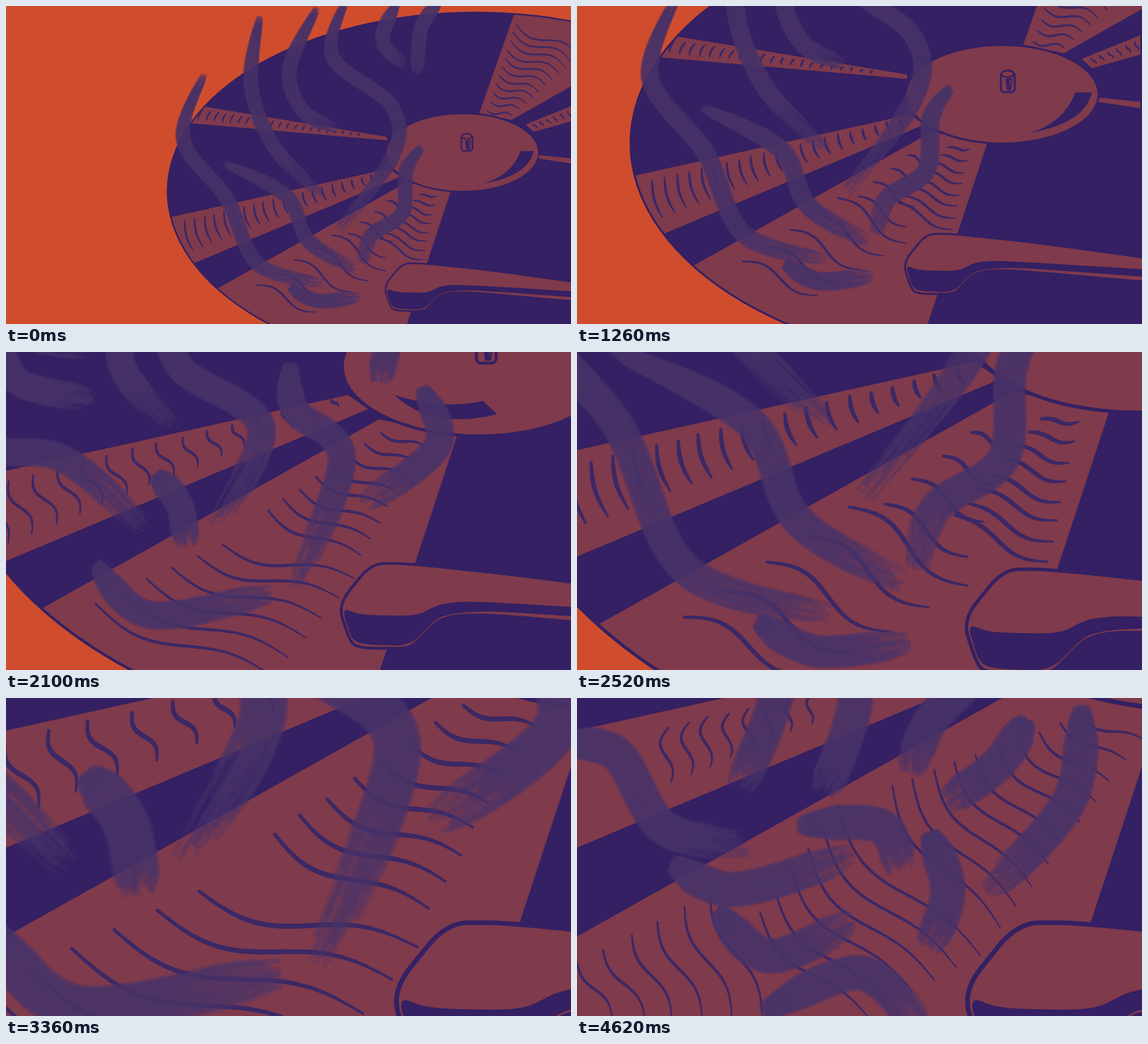
Recreate the animation shown at these times as an HTML page with a canvas. Size 998 by 561 pixels, loop 5.04 s.

```html
<!DOCTYPE html>
<html lang="en">
<head>
<meta charset="utf-8">
<title>Smoking record</title>
<style>
  html, body { margin: 0; width: 100%; height: 100%; overflow: hidden; background: #cf4d2d; }
  canvas { display: block; }
</style>
</head>
<body>
<canvas id="stage" width="998" height="561"></canvas>
<script>
const ctx = document.getElementById('stage').getContext('2d');
const ORANGE = '#cf4d2d', INDIGO = '#342062', MAROON = '#7f3a4c', MARK = '#3b2865', SMOKE = '#47336a';
const STEP = 420;

// Scale and offset of the camera at each step; it then rests on the last one.
const cameras = [
  [1, 0, 0], [1.035, -35, -23], [1.115, -116, -76], [1.26, -265, -170], [1.455, -452, -289],
  [1.78, -601, -435], [2.19, -780, -611], [2.35, -852, -747], [2.97, -1301, -952]
];

// smoke: key points of each brush stroke, as seen by the camera of step "view".
// fans: count, first mark, last mark, bow, wave; the marks between are blended.
const rising = {
  seed: 11, view: 0, width: 27, line: 3.6, shine: [843,313, 892,300, 909,256, 932,256, 922,300],
  smoke: [
    [350,120, 313,235, 390,340, 445,455, 560,490],
    [448,18, 433,140, 475,250, 560,338],
    [550,3, 501,110, 525,185, 585,217],
    [600,-12, 577,90, 680,175, 685,260, 588,395],
    [690,-5, 665,60, 705,105],
    [765,-8, 733,40, 727,122],
    [735,248, 707,290, 700,365, 645,405, 630,455],
    [385,277, 495,335, 535,415, 620,465],
    [500,495, 550,520, 625,512]
  ],
  fans: [
    [21, 316,380,330,430, 662,294,667,303, .08,0],
    [4, 675,343,703,356, 604,401,672,445, 0,-.07],
    [5, 576,405,671,467, 442,493,547,540, 0,-.07],
    [8, 731,332,760,336, 661,411,736,447, .04,-.05]
  ]
};
const drifting = {
  seed: 23, view: 2, width: 32, line: 3, shine: [723,287, 770,302, 811,293, 825,306, 760,322],
  smoke: [
    [222,-8, 209,90, 270,170, 355,195],
    [260,18, 375,115, 390,215, 445,278],
    [340,-8, 405,20, 443,80],
    [605,-10, 535,65, 500,150],
    [690,-10, 685,55, 620,95, 610,150],
    [735,95, 690,165, 675,232],
    [430,145, 455,215, 543,280, 490,390],
    [575,208, 580,260, 632,315, 580,458],
    [720,235, 738,300, 655,365],
    [192,208, 235,298, 325,315, 415,393],
    [255,185, 275,230, 358,250],
    [358,430, 420,487, 555,463],
    [425,330, 452,365, 460,412]
  ],
  fans: [
    [15, 315,378,340,434, 660,291,668,299, 0,.1],
    [6, 427,493,602,567, 553,436,683,468, .03,.05],
    [8, 597,402,690,445, 710,325,752,336, .05,.05]
  ]
};
const curling = {
  seed: 37, view: 4, width: 41, line: 2.8, shine: [788,309, 840,308, 869,277, 890,283, 860,315],
  smoke: [
    [-95,-130, 70,45, 115,210, 280,258],
    [125,-25, 232,70, 250,180, 315,242],
    [440,-15, 387,45, 378,125],
    [535,-20, 552,50, 445,140, 442,218],
    [315,115, 345,215, 468,280, 415,432],
    [605,138, 545,230, 530,312],
    [90,283, 160,395, 300,403, 425,490],
    [185,260, 240,310, 348,322]
  ],
  fans: [
    [17, 318,382,340,436, 665,293,672,299, -.04,.08],
    [4, 423,510,545,560, 520,488,677,534, .07,.04],
    [4, 525,438,601,486, 590,400,600,450, .22,0],
    [6, 725,328,755,337, 634,385,729,436, .05,.06],
    [5, 640,410,706,443, 618,477,660,524, .03,.06]
  ]
};
const sinking = {
  seed: 41, view: 8, width: 70, line: 1.7, shine: rising.shine,
  smoke: [
    [180,-25, 430,40, 520,170, 425,415],
    [-60,345, 180,350, 290,480, 450,512],
    [835,-60, 860,150, 760,295, 730,390],
    [620,182, 640,260, 580,430],
    [700,-30, 665,70, 655,180],
    [-40,120, 100,182, 285,190],
    [308,552, 430,566, 595,532]
  ],
  fans: [
    [4, 449,346,471,376, 519,331,529,347, -.12,0],
    [4, 452,474,462,510, 494,472,515,510, -.04,.03],
    [5, 527,433,596,512, 573,404,667,486, .11,.06],
    [4, 616,410,674,467, 649,365,730,429, .09,.02],
    [5, 660,359,743,413, 727,331,769,340, .09,.02]
  ]
};
const parting = {
  seed: 53, view: 8, width: 64, line: 1.7, shine: drifting.shine,
  smoke: [
    [-60,85, 65,95, 155,230, 310,260],
    [365,-50, 335,50, 285,162],
    [498,-30, 480,55, 435,170],
    [720,-50, 625,40, 590,135],
    [388,225, 535,225, 572,305],
    [165,290, 280,338, 490,275],
    [245,373, 340,455, 490,393],
    [325,555, 500,485, 610,585],
    [795,35, 745,115, 650,185],
    [892,12, 870,180, 725,345],
    [622,235, 655,340, 620,445]
  ],
  fans: [
    [8, 492,338,493,371, 577,318,577,336, .08,.1],
    [6, 438,478,460,510, 518,437,548,510, 0,.06],
    [6, 547,447,611,510, 593,384,677,474, .07,.05],
    [10, 625,373,689,457, 738,331,774,345, .07,.05]
  ]
};
const cycle = [rising, curling, drifting];
const poses = [...cycle, ...cycle, ...cycle, sinking, { ...parting, fans: sinking.fans }, parting];

const sectors = [
  [347,177, 300,169, 290,203, 329,207, 673,237, 673,231],
  [293,372, 250,381, 250,488, 334,453, 697,301, 677,287],
  [376,497, 200,595, 400,750, 646,750, 785,328, 708,311],
  [836,189, 897,16, 905,-7, 1100,-7, 1100,84, 893,201],
  [918,209, 1000,176, 1000,203, 932,222],
  [940,263, 1000,269, 1000,278, 940,269]
];
const arm = [667,495, 700,454, 737,454, 860,467, 1060,495, 1060,526, 826,505, 785,505, 765,511,
  742,535, 732,538, 694,538, 680,534];
const underside = [671,498, 690,505, 745,506, 768,494, 800,491, 1060,507, 1060,518, 826,501, 785,503,
  765,508, 738,536, 690,534, 680,528];

const lerp = (a, b, t) => a + (b - a) * t;

function random(seed) {
  return () => (seed = (seed * 16807) % 2147483647) / 2147483647;
}

function camera(step) {
  return cameras[Math.min(step, cameras.length - 1)];
}

function look(step, from = 0) {
  const [s, x, y] = camera(step), [rs, rx, ry] = camera(from);
  ctx.setTransform(s, 0, 0, s, x, y);
  ctx.scale(1 / rs, 1 / rs);
  ctx.translate(-rx, -ry);
}

function paint(fill, line) {
  if (fill) { ctx.fillStyle = fill; ctx.fill(); }
  if (line) { ctx.strokeStyle = INDIGO; ctx.lineWidth = line; ctx.stroke(); }
}

function polygon(points, fill) {
  ctx.beginPath();
  for (let i = 0; i < points.length; i += 2) ctx.lineTo(points[i], points[i + 1]);
  paint(fill);
}

// Closed outline with every corner rounded.
function blob(p, fill, line) {
  const n = p.length;
  ctx.beginPath();
  for (let i = 0; i < n; i += 2) {
    const x = p[i], y = p[i + 1], nx = p[(i + 2) % n], ny = p[(i + 3) % n];
    const px = p[(i + n - 2) % n], py = p[(i + n - 1) % n];
    ctx.lineTo(lerp(x, px, .35), lerp(y, py, .35));
    ctx.quadraticCurveTo(x, y, lerp(x, nx, .35), lerp(y, ny, .35));
  }
  ctx.closePath();
  paint(fill, line);
}

function ellipse(x, y, rx, ry, fill, line) {
  ctx.beginPath();
  ctx.ellipse(x, y, rx, ry, 0, 0, 7);
  paint(fill, line);
}

function mark(x1, y1, x2, y2, bow, wave, width) {
  const dx = x2 - x1, dy = y2 - y1, pieces = 18;
  const at = t => {
    const off = bow * Math.sin(Math.PI * t) + wave * Math.sin(2 * Math.PI * t);
    return [x1 + dx * t - dy * off, y1 + dy * t + dx * off];
  };
  for (let i = 0; i < pieces; i++) {
    const t = i / pieces;
    ctx.lineWidth = width * (.4 + .6 * Math.sin(Math.PI * (.15 + .85 * t)));
    ctx.beginPath();
    ctx.moveTo(...at(t));
    ctx.lineTo(...at(t + 1 / pieces));
    ctx.stroke();
  }
}

function fan([count, ...shape], width, rnd) {
  const [bow, wave] = shape.slice(8);
  for (let i = 0; i < count; i++) {
    const t = i / (count - 1);
    const ends = [0, 1, 2, 3].map(k => lerp(shape[k], shape[k + 4], t) + (rnd() - .5) * 2);
    mark(...ends, bow, wave, width);
  }
}

function spline(p, t) {
  const last = p.length / 2 - 1;
  const i = Math.min(last - 1, Math.floor(t * last)), u = t * last - i;
  return [0, 1].map(axis => {
    const at = k => p[2 * Math.max(0, Math.min(last, k)) + axis];
    const a = at(i - 1), b = at(i), c = at(i + 1), d = at(i + 2);
    return b + .5 * u * (c - a + u * (2 * a - 5 * b + 4 * c - d + u * (3 * (b - c) + d - a)));
  });
}

// A dry brush: thin overlapping bristles that start and stop unevenly.
function brush(points, width, rnd) {
  const samples = 60, bristles = 70;
  const spine = Array.from({ length: samples + 1 }, (_, i) => {
    const t = i / samples;
    const [x, y] = spline(points, t);
    const [ax, ay] = spline(points, Math.max(0, t - .01));
    const [bx, by] = spline(points, Math.min(1, t + .01));
    const d = Math.hypot(bx - ax, by - ay) || 1;
    const w = width * Math.min(1, .4 + 2.5 * t, .65 + 2 * (1 - t));
    return { x, y, nx: (ay - by) / d * w, ny: (bx - ax) / d * w };
  });
  ctx.strokeStyle = SMOKE;
  ctx.lineWidth = width / 9;
  ctx.globalAlpha = .24;
  for (let j = 0; j < bristles; j++) {
    const off = (rnd() + j) / bristles * .92 - .46;
    const from = Math.floor(rnd() * 6), to = samples - Math.floor(rnd() * 18);
    ctx.beginPath();
    spine.slice(from, to + 1).forEach(s => ctx.lineTo(s.x + s.nx * off, s.y + s.ny * off));
    ctx.stroke();
  }
  ctx.globalAlpha = 1;
}

function record(pose) {
  ellipse(830, 327, 546, 317, INDIGO);
  ctx.save();
  ellipse(830, 327, 543.2, 314.2);
  ctx.clip();
  sectors.forEach(points => polygon(points, MAROON));
  ctx.strokeStyle = MARK;
  ctx.lineCap = 'round';
  const rnd = random(pose.seed);
  fan([21, 348,184,340,201, 625,226,622,229, .1,0], 2.8, rnd);
  fan([11, 850,184,895,193, 902,32,1010,88, 0,.08], 3, rnd);
  fan([6, 930,208,938,216, 992,185,998,197, 0,.1], 2.5, rnd);
  pose.fans.forEach(f => fan(f, pose.line, rnd));
  ctx.restore();
}

function crescent([x1, y1, cx, cy, x2, y2, x3, y3, dx, dy]) {
  ctx.beginPath();
  ctx.moveTo(x1, y1);
  ctx.quadraticCurveTo(cx, cy, x2, y2);
  ctx.lineTo(x3, y3);
  ctx.quadraticCurveTo(dx, dy, x1, y1);
  paint(INDIGO);
}

function hub(pose) {
  ellipse(806.5, 258.5, 135, 69, MAROON, 2.8);
  crescent(pose.shine);
  ctx.beginPath();
  ctx.roundRect(804.5, 225.5, 19.5, 30, [8, 8, 5, 5]);
  paint(MAROON, 2.8);
  ellipse(814, 230, 8.5, 4.5, MAROON, 2.2);
  polygon([811,237, 821,236, 819,253, 813,253], INDIGO);
  polygon([817,238, 819,238, 817,250], MAROON);
}

function draw(step) {
  const pose = poses[step], rnd = random(pose.seed * 97);
  ctx.resetTransform();
  ctx.fillStyle = ORANGE;
  ctx.fillRect(0, 0, 998, 561);
  ctx.lineJoin = 'round';
  look(step);
  record(pose);
  hub(pose);
  blob(arm, MAROON, 2.8);
  blob(underside, INDIGO);
  look(step, pose.view);
  ctx.lineCap = 'butt';
  pose.smoke.forEach(points => brush(points, pose.width, rnd));
}

let shown = -1;
function tick() {
  const step = Math.floor(performance.now() / STEP) % poses.length;
  if (step !== shown) draw(shown = step);
  requestAnimationFrame(tick);
}
tick();
</script>
</body>
</html>
```
